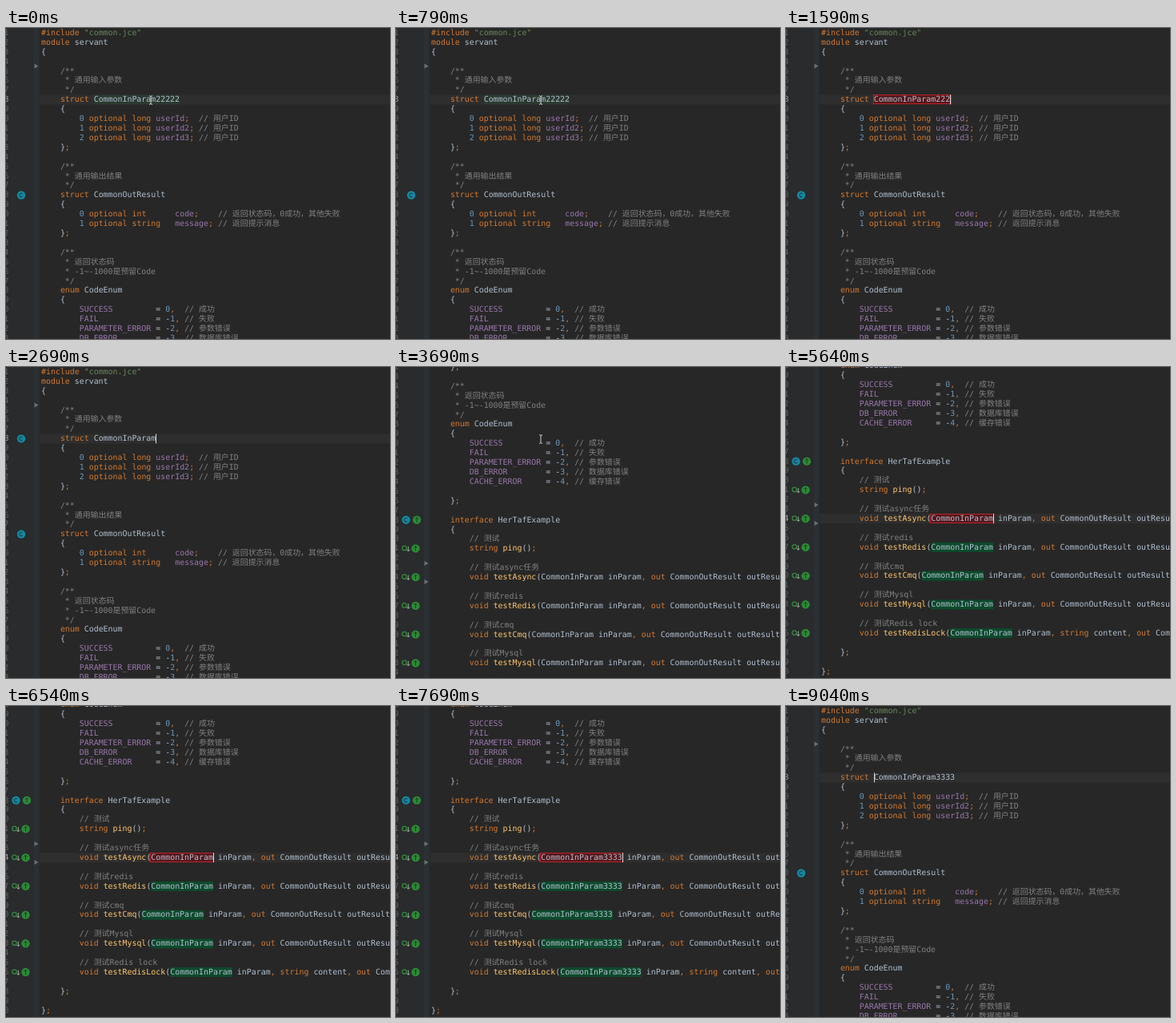
Recreate the animation shown at these times as an HTML page with a canvas. Size 480x388 px, loop 9090 ms.

```html
<!DOCTYPE html>
<html lang="zh-CN">
<head>
<meta charset="utf-8">
<style>
html, body { margin: 0; width: 100%; height: 100%; overflow: hidden; background: #272727; }
canvas { display: block; width: 480px; height: 388px; }
</style>
</head>
<body>
<canvas id="stage"></canvas>
<script>
const W = 480, H = 388, LOOP = 9090;
const CHAR = 5.972, LINE = 11.91, LEFT = 44, TOP = 6, BASE = 2.9;
const SCROLL = 329, DECL = 7, CALL = 43;
const FONT = '9.92px "DejaVu Sans Mono", "Noto Sans CJK SC", "Noto Sans CJK", monospace';

const canvas = document.getElementById('stage');
const ctx = canvas.getContext('2d');
const dpr = window.devicePixelRatio || 1;
canvas.width = W * dpr;
canvas.height = H * dpr;

// '@' stands for the symbol being renamed
const lines = `#include "common.jce"
module servant
{

    /**
     * 通用输入参数
     */
    struct @
    {
        0 optional long userId;  // 用户ID
        1 optional long userId2; // 用户ID
        2 optional long userId3; // 用户ID
    };

    /**
     * 通用输出结果
     */
    struct CommonOutResult
    {
        0 optional int      code;    // 返回状态码，0成功，其他失败
        1 optional string   message; // 返回提示消息
    };

    /**
     * 返回状态码
     * -1~-1000是预留Code
     */
    enum CodeEnum
    {
        SUCCESS         = 0,  // 成功
        FAIL            = -1, // 失败
        PARAMETER_ERROR = -2, // 参数错误
        DB_ERROR        = -3, // 数据库错误
        CACHE_ERROR     = -4, // 缓存错误

    };

    interface HerTafExample
    {
        // 测试
        string ping();

        // 测试async任务
        void testAsync(@ inParam, out CommonOutResult outResult);

        // 测试redis
        void testRedis(@ inParam, out CommonOutResult outResult);

        // 测试cmq
        void testCmq(@ inParam, out CommonOutResult outResult);

        // 测试Mysql
        void testMysql(@ inParam, out CommonOutResult outResult);

        // 测试Redis lock
        void testRedisLock(@ inParam, string content, out CommonOutResult outResult);

    };

};`.split('\n');

const rules = [
  ['#808080', /^(\/\/.*|\/\*\*|\*.*)/],
  ['#6a8759', /^"[^"]*"/],
  ['#d4792f', /^(#include|(module|struct|optional|long|int|string|enum|interface|void|out)\b|[,;])/],
  ['#9876aa', /^([A-Z_]{4,}\b|\w+(?=;))/],
  ['#ffc66d', /^\w+(?=\()/],
  ['#6897bb', /^\d+/],
  ['#b1bfcf', /^(\w+|[^\s\w])/]
];

function tokenize(text) {
  const out = [];
  let col = 0;
  while (col < text.length) {
    const rest = text.slice(col);
    const rule = rules.find(r => r[1].test(rest));
    if (!rule) { col++; continue; }
    const word = rest.match(rule[1])[0];
    out.push({ col, word, color: rule[0] });
    col += word.length;
  }
  return out;
}

const cx = col => LEFT + col * CHAR;
const cy = row => TOP + row * LINE;
const ease = p => p * p * (3 - 2 * p);
const ramp = (t, a, b) => ease(Math.min(1, Math.max(0, (t - a) / (b - a))));
const passed = (t, times) => times.filter(x => t >= x).length;
const within = (t, a, b) => t >= a && t < b;

function stateAt(t) {
  const removed = passed(t, [1330, 1530, 1700, 1860, 2020]);
  const added = passed(t, [6850, 7010, 7170, 7330]);
  const name = 'CommonInParam' + (added ? '3'.repeat(added) : '2'.repeat(5 - removed));
  const atCall = within(t, 4500, 8500);
  const row = atCall ? CALL : DECL;
  const renaming = within(t, 900, 2350) || within(t, 5500, 7950);
  const start = lines[row].indexOf('@');
  let caret = start + name.length;
  if (t < 900) caret = -1;
  else if (within(t, 4500, 5500)) caret = start + 9;
  else if (t >= 8500) caret = start;
  const move = ramp(t, 4000, 4450);
  return {
    name, row, renaming, caret,
    marked: atCall || t < 900,
    scroll: t < 8500 ? SCROLL * ramp(t, 3100, 3950) : 0,
    mouse: t < 900 || within(t, 3000, 5600),
    mx: 181 + 55 * move, my: 90 + 99 * move,
    ring: within(t, 4500, 4950)
  };
}

function disc(x, y, color) {
  ctx.fillStyle = color;
  ctx.beginPath();
  ctx.arc(x, y, 5.2, 0, 7);
  ctx.fill();
}

function stroke(color, width, ...points) {
  ctx.strokeStyle = color;
  ctx.lineWidth = width;
  ctx.beginPath();
  points.forEach(([x, y], i) => i ? ctx.lineTo(x, y) : ctx.moveTo(x, y));
  ctx.stroke();
}

function arrow(x, y, dir, color) {
  stroke(color, 1, [x, y - 3], [x, y + 3]);
  stroke(color, 1, [x - 2, y + dir], [x, y + 3 * dir], [x + 2, y + dir]);
}

function classIcon(x, y) {
  disc(x, y, '#118aa4');
  ctx.strokeStyle = '#24434b';
  ctx.lineWidth = 1.2;
  ctx.beginPath();
  ctx.arc(x, y, 2.2, 0.8, 5.5);
  ctx.stroke();
}

function implIcon(x, y) {
  disc(x, y, '#2c8a36');
  arrow(x, y, -1, '#1f3a22');
}

function methodIcons(y) {
  ctx.strokeStyle = '#348a3c';
  ctx.lineWidth = 1.3;
  ctx.beginPath();
  ctx.arc(10.5, y - 0.5, 2.7, 0, 7);
  ctx.stroke();
  arrow(15.3, y + 0.5, 1, '#a3aaa4');
  implIcon(24.5, y);
}

function drawGutter(s) {
  ctx.fillStyle = '#292b2c';
  ctx.fillRect(0, 0, 42, H);
  ctx.fillStyle = '#2a3034';
  ctx.fillRect(35, 0, 6, H);
  lines.forEach((line, i) => {
    const y = cy(i) - s.scroll;
    if (y < -10 || y > H + 10) return;
    ctx.fillStyle = i === s.row ? '#a4a3a3' : '#606366';
    ctx.fillText((i + 1) % 10, -2.6, y + BASE);
    if (i === 17 || i === DECL && s.name === 'CommonInParam') classIcon(19, y);
    if (i === 37) {
      classIcon(12.5, y);
      implIcon(26, y);
    }
    if (/\w+\(/.test(line)) methodIcons(y);
  });
  ctx.fillStyle = '#6c7072';
  for (const doc of [47.5, 501, 524]) {
    const y = doc - s.scroll;
    ctx.beginPath();
    ctx.moveTo(35.5, y - 3);
    ctx.lineTo(40.5, y);
    ctx.lineTo(35.5, y + 3);
    ctx.fill();
  }
}

function drawMark(s, i, col, y) {
  const x = cx(col), w = s.name.length * CHAR;
  if (s.renaming && i === s.row) {
    ctx.fillStyle = '#55171b';
    ctx.fillRect(x, y - 6, w, 12);
    ctx.strokeStyle = '#b8242a';
    ctx.lineWidth = 1;
    ctx.strokeRect(Math.round(x) - 0.5, Math.round(y) - 5.5, Math.round(w) + 1, 11);
  } else if (s.marked) {
    ctx.fillStyle = s.renaming ? '#0d4a2c' : '#2c3a31';
    ctx.fillRect(x, y - 6, w, 12);
  }
}

function drawCode(s) {
  lines.forEach((line, i) => {
    const y = cy(i) - s.scroll;
    if (y < -10 || y > H + 10) return;
    if (i === s.row) {
      ctx.fillStyle = '#2e2e2e';
      ctx.fillRect(42, y - 6, W, 12);
    }
    const mark = line.indexOf('@');
    if (mark >= 0) drawMark(s, i, mark, y);
    for (const k of tokenize(line.replace('@', s.name))) {
      ctx.fillStyle = k.color;
      ctx.fillText(k.word, cx(k.col), y + BASE);
    }
    if (i === s.row && s.caret >= 0) {
      ctx.fillStyle = '#dddddd';
      ctx.fillRect(Math.round(cx(s.caret)), y - 6, 1, 12);
    }
  });
}

function drawMouse(s) {
  const { mx: x, my: y } = s;
  stroke('#d0d0d0', 1, [x - 2, y - 5.5], [x, y - 4.5], [x + 2, y - 5.5]);
  stroke('#d0d0d0', 1, [x, y - 4.5], [x, y + 4.5]);
  stroke('#d0d0d0', 1, [x - 2, y + 5.5], [x, y + 4.5], [x + 2, y + 5.5]);
  if (!s.ring) return;
  ctx.strokeStyle = '#999999';
  ctx.lineWidth = 1.3;
  ctx.setLineDash([2, 1.2]);
  ctx.beginPath();
  ctx.arc(x, y, 16.5, 0, 7);
  ctx.stroke();
  ctx.setLineDash([]);
}

function draw(t) {
  const s = stateAt(t);
  ctx.setTransform(dpr, 0, 0, dpr, 0, 0);
  ctx.font = FONT;
  ctx.textRendering = 'geometricPrecision';
  ctx.fillStyle = '#272727';
  ctx.fillRect(0, 0, W, H);
  drawGutter(s);
  drawCode(s);
  if (s.mouse) drawMouse(s);
}

const begin = performance.now();
function tick() {
  draw((performance.now() - begin) % LOOP);
  requestAnimationFrame(tick);
}
tick();
</script>
</body>
</html>
```
